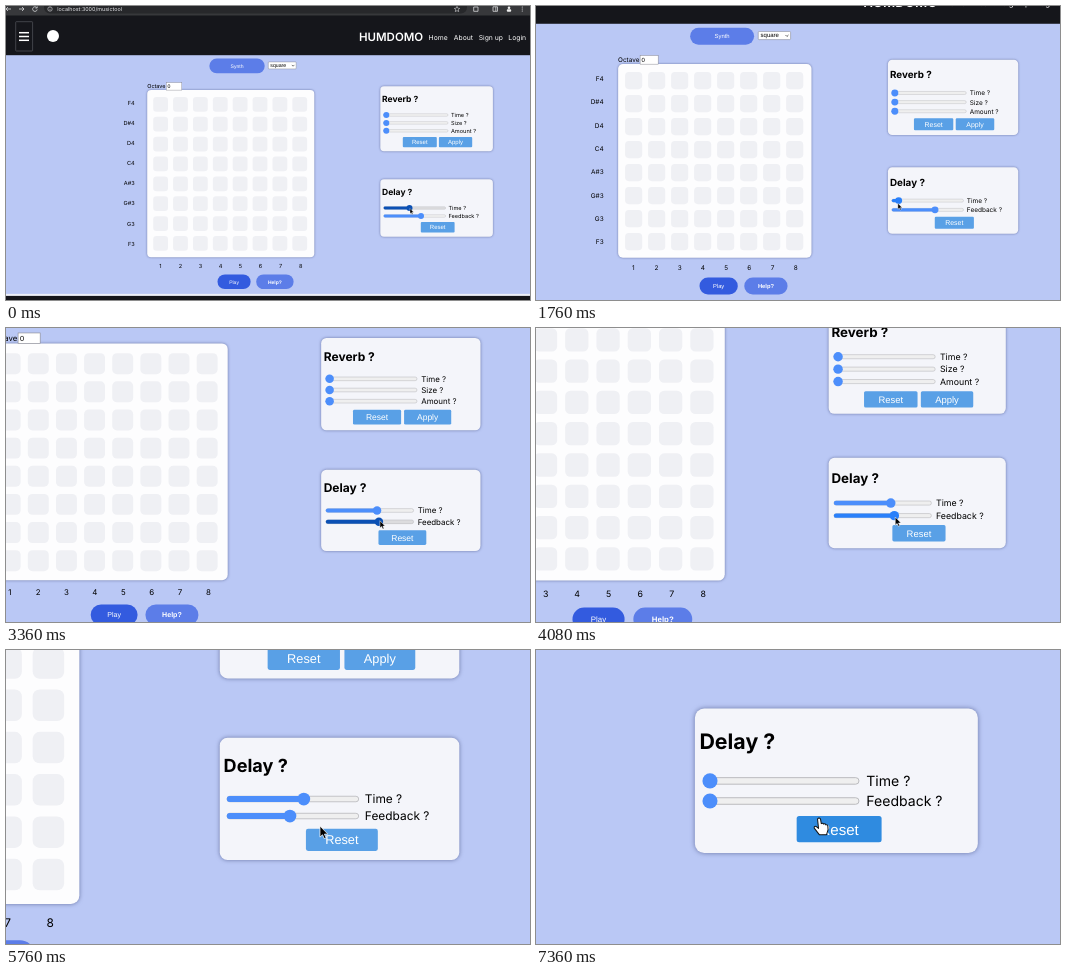
Animation of 524x294 px, one loop 7440 ms. Source, as an HTML page:

```html
<!DOCTYPE html>
<html lang="en">
<head>
<meta charset="utf-8">
<title>Step sequencer zoom</title>
<style>
  html, body { margin: 0; height: 100%; overflow: hidden; background: #bac8f5; }
  svg { display: block; width: 100vw; height: 100vh; }
  text { font-family: Inter, "Open Sans", sans-serif; text-rendering: geometricPrecision; white-space: pre; }
  .ui { font-family: "Liberation Sans", Arial, sans-serif; }
  .panel { filter: drop-shadow(0 0 1px rgba(50, 60, 110, .6)); }
</style>
</head>
<body>
<svg id="stage" viewBox="0 0 524 294"></svg>
<script>
const svg = document.getElementById('stage');

function add(tag, attrs, content = '') {
  const el = document.createElementNS('http://www.w3.org/2000/svg', tag);
  for (const key in attrs) el.setAttribute(key, attrs[key]);
  el.textContent = content;
  return svg.appendChild(el);
}
const rect = (x, y, x2, y2, fill, rx = 0, more = {}) =>
  add('rect', { x, y, width: x2 - x, height: y2 - y, fill, rx, ...more });
const text = (s, x, y, size, more = {}) => add('text', { x, y, 'font-size': size, ...more }, s);
const line = (d, stroke, width, more = {}) =>
  add('path', { d, stroke, 'stroke-width': width, fill: 'none', ...more });
const dot = (cx, cy, r, fill) => add('circle', { cx, cy, r, fill });
const middle = { 'text-anchor': 'middle' };
const end = { 'text-anchor': 'end' };

function button(label, x, y, x2, y2, fill, rx, size, more = {}) {
  const box = rect(x, y, x2, y2, fill, rx);
  text(label, (x + x2) / 2, (y + y2) / 2 + size * .36, size,
    { ...middle, fill: '#fff', class: 'ui', ...more });
  return box;
}

const COLORS = { idle: '#4c8efb', hover: '#0b50b4', drag: '#2a80fa' };
const MIN = 380.3;

function slider(label, y, right, labelX) {
  const track = rect(377.7, y - 1.3, right, y + 1.3, '#efefef', 1.3, { stroke: '#b4b4b8', 'stroke-width': .35 });
  const fill = rect(377.6, y - 1.4, MIN, y + 1.4, COLORS.idle, 1.4);
  const thumb = dot(MIN, y, 3, COLORS.idle);
  text(label, labelX, y + 2.1, 5.6);
  return (x, state) => {
    track.setAttribute('fill', state === 'hover' ? '#dcdcde' : '#efefef');
    fill.setAttribute('width', x - 377.6);
    thumb.setAttribute('cx', x);
    for (const el of [fill, thumb]) el.setAttribute('fill', COLORS[state]);
  };
}

function panel(title, y, y2) {
  rect(374.3, y, 486.9, y2, '#f4f5fa', 3.7, { class: 'panel' });
  text(title, 376.1, y + 16.1, 8.5, { 'font-weight': 700 });
}

// Browser bar
const DARK = '#15161b';
rect(0, 0, 524, 49.2, DARK);
rect(0, 0, 524, 9.5, '#37383b');
rect(38, -5, 461, 7.5, '#27282b', 6);
const thin = '#d5d6d9';
line('M5 3H0M2 1L0 3L2 5M13 3H18M16 1L18 3L16 5', thin, .8);
line('M30.6 1.5A2.3 2.3 0 1 0 31.2 3.5M31.2 .4V2H29.4', thin, .8);
line('M44 2.8V4.4M44 1.4V2', thin, .6);
add('circle', { cx: 44, cy: 3, r: 2.2, fill: 'none', stroke: thin, 'stroke-width': .6 });
text('localhost:3000/musictool', 51.3, 5.2, 5.4, { fill: '#e6e7ea' });
line('M451 .4L451.8 2.2L453.7 2.4L452.3 3.7L452.7 5.6L451 4.6L449.3 5.6L449.7 3.7L448.3 2.4L450.2 2.2Z', thin, .6);
line('M467.7 1H472V5.3H467.7ZM487 .8H491.5V5.3H487ZM489.8 .8V5.3', thin, .8);
dot(503, 1.7, 1.3, '#eee');
rect(500.8, 3.3, 505.2, 5.7, '#eee', 1);
for (const y of [1, 3, 5]) dot(516.3, y, .6, thin);

// Site header and footer
rect(9.7, 15.7, 26.6, 45, 'none', .6, { stroke: '#55565c', 'stroke-width': .7 });
for (const y of [26.7, 30.5, 34.3]) line(`M13 ${y}H23`, '#fff', 1.5);
dot(47, 30, 6, '#fff');
text('HUMDOMO', 417.2, 34.8, 11.5, { ...end, fill: '#fff', 'font-weight': 600 });
[['Home', 422.6], ['About', 447.8], ['Sign up', 472.7], ['Login', 502.3]]
  .forEach(([s, x]) => text(s, x, 33.5, 6.8, { fill: '#fff' }));
rect(0, 287.9, 524, 290, '#eef0f9');
rect(0, 289.9, 524, 294, DARK);

// Sequencer
button('Synth', 203.4, 52.6, 258.7, 67.3, '#5c7de8', 7.3, 5.1);
rect(262.3, 55.9, 290.2, 62.9, '#fff', .8, { stroke: '#77787e', 'stroke-width': .4 });
text('square', 264.3, 61, 5.2, { class: 'ui' });
line('M285.8 58.9L287.1 60.2L288.4 58.9', '#222', .6);
text('Octave', 141.2, 82.2, 5.5);
rect(141.2, 84, 308.3, 251.3, '#fdfdfe', 4, { class: 'panel' });
rect(160.2, 76.6, 175.8, 84.1, '#fff', 0, { stroke: '#808188', 'stroke-width': .4 });
text('0', 161.5, 82.2, 5.2, { class: 'ui' });
['F4', 'D#4', 'D4', 'C4', 'A#3', 'G#3', 'G3', 'F3'].forEach((note, row) => {
  text(note, 128.7, 98.6 + 20.15 * row, 5.6, end);
  text(row + 1, 154.4 + 20.03 * row, 262, 5.6, middle);
  for (let col = 0; col < 8; col++) {
    const x = 154.6 + 19.88 * col, y = 98.3 + 19.88 * row;
    rect(x - 7.4, y - 7.4, x + 7.4, y + 7.4, '#eff0f4', 3.3);
  }
});
button('Play', 211.5, 268.4, 244.6, 283.1, '#335bdf', 7.3, 5);
button('Help?', 250.2, 268.4, 287.6, 283.1, '#5c7de8', 7.3, 5, { 'font-weight': 700 });

// Effects
const BLUE = '#59a0e6';
panel('Reverb ?', 80.2, 145.3);
['Time ?', 'Size ?', 'Amount ?'].forEach((s, i) => slider(s, 109 + 7.9 * i, 442, 445));
button('Reset', 396.8, 130.9, 430.8, 141.3, BLUE, 1, 6);
button('Apply', 432.9, 130.9, 466.2, 141.3, BLUE, 1, 6);

panel('Delay ?', 173.2, 230.7);
const setTime = slider('Time ?', 202, 439.6, 442.5);
const setFeedback = slider('Feedback ?', 210, 439.6, 442.5);
const reset = button('Reset', 414.8, 216, 448.6, 226.4, BLUE, 1, 6);

// Pointers, tip at the origin
const arrow = add('path', {
  d: 'M0 0V5.2L1.2 4.1L2 5.9L2.9 5.5L2.1 3.8H3.7Z',
  fill: '#000', stroke: '#fff', 'stroke-width': .35 });
const hand = add('path', {
  d: 'M-.6 .4Q0 -.5 .6 .4L.9 2.2Q1.5 1.8 1.8 2.4Q2.4 2 2.7 2.7Q3.4 2.4 3.5 3.2L3.6 4.6L3 6.6H.1L-1.9 4Q-2.1 3.1 -1.2 3.3L-.2 4.1Z',
  fill: '#fff', stroke: '#111', 'stroke-width': .4, 'stroke-linejoin': 'round' });

// time, pointer x, pointer y, Time thumb, Feedback thumb
const KEYS = [
  [0, 404, 202.5, 403.5, 415],
  [300, 404, 202.5, 403.5, 415],
  [950, 379, 203, MIN, 415],
  [1500, 379.3, 203.8, MIN, 415],
  [2320, 390.7, 205.3, 390.7, 415],
  [2800, 414, 205, 413.8, 415],
  [3100, 415.5, 208.8, 413.8, 415],
  [3500, 416, 209.5, 413.8, 415.2],
  [4720, 417.3, 212.4, 413.8, 417],
  [5200, 407.5, 213, 413.8, 407.3],
  [5760, 421.4, 214.7, 413.8, 407.3],
  [6150, 423.7, 216.8, 413.8, 407.3],
  [7440, 423.7, 216.8, 413.8, 407.3]
];
function pose(t) {
  const i = KEYS.findIndex(k => k[0] > t);
  const a = KEYS[i - 1], b = KEYS[i], p = (t - a[0]) / (b[0] - a[0]);
  return a.map((v, n) => v + (b[n] - v) * p);
}

// The visible width shrinks at a steady rate with soft ends.
const RATE = .0985, RAMP = .76, SHRINK = .602, STOP = SHRINK / RATE + RAMP;
function view(t) {
  const u = Math.min(t / 1000, STOP);
  if (u > STOP - RAMP) return 1 - SHRINK + RATE * (STOP - u) ** 2 / (2 * RAMP);
  return 1 - RATE * (u < RAMP ? u * u / (2 * RAMP) : u - RAMP / 2);
}

const state = (t, from, press, release, to) =>
  t < from || t >= to ? 'idle' : t >= press && t < release ? 'drag' : 'hover';

function draw() {
  const t = Math.floor(performance.now() % 7440 / 80) * 80;
  const v = view(t);
  svg.setAttribute('viewBox', [516.7 * (1 - v), 249 * (1 - v), 524 * v, 294 * v].join(' '));

  const [, x, y, time, feedback] = pose(t);
  const cleared = t >= 6700, over = y >= 216;
  setTime(cleared ? MIN : time, state(t, 0, 300, 2800, 2950));
  setFeedback(cleared ? MIN : feedback, state(t, 3050, 3500, 5200, 5350));
  reset.setAttribute('fill', over ? '#2f8be0' : BLUE);
  for (const [el, shown] of [[arrow, !over], [hand, over]]) {
    el.setAttribute('transform', `translate(${x} ${y})`);
    el.setAttribute('visibility', shown ? 'visible' : 'hidden');
  }
  requestAnimationFrame(draw);
}
draw();
</script>
</body>
</html>
```
